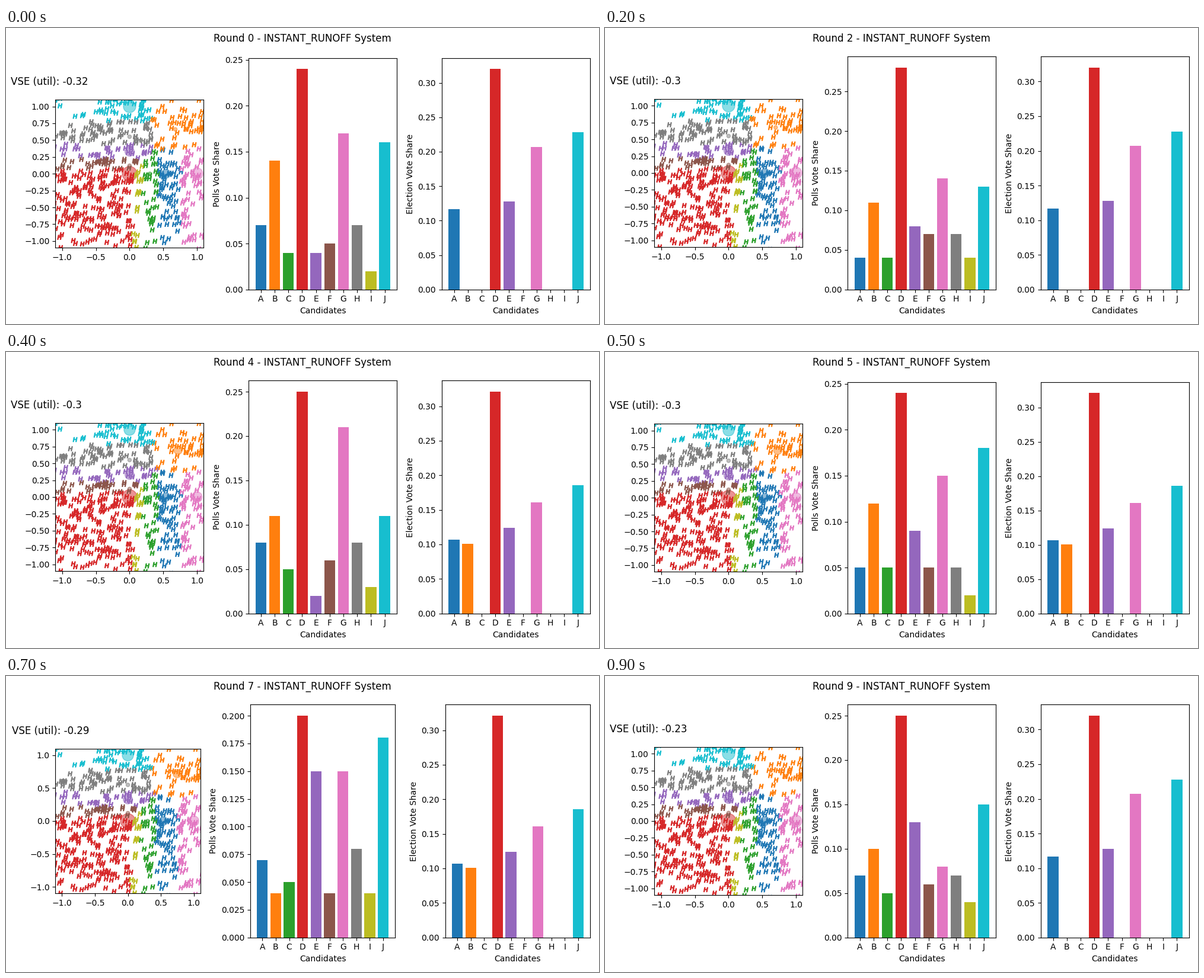
Write a matplotlib script that moves like this. It is 1000 px wide and 500 px high and loops after 1000 ms.

```python
import numpy as np
import matplotlib.pyplot as plt
from matplotlib.animation import FuncAnimation

ROUNDS = 10
NAMES = list("ABCDEFGHIJ")
COLORS = np.array([f"C{i}" for i in range(len(NAMES))])
MARGINS = dict(left=0.125, right=0.9, bottom=0.11, top=0.88, wspace=0.2)

# Poll percentages at key rounds; rounds between are averaged
POLL_ROUNDS = [0, 2, 3, 4, 5, 7, 9]
POLLS = np.array([
    [7, 14, 4, 24, 4, 5, 17, 7, 2, 16],
    [4, 11, 4, 28, 8, 7, 14, 7, 4, 13],
    [6, 12, 3, 18, 9, 2, 21, 11, 2, 16],
    [8, 11, 5, 25, 2, 6, 21, 8, 3, 11],
    [5, 12, 5, 24, 9, 5, 15, 5, 2, 18],
    [7, 4, 5, 20, 15, 4, 15, 8, 4, 18],
    [7, 10, 5, 25, 13, 6, 8, 7, 4, 15],
]) / 100

# Final election shares, without and with B among the finalists
WITHOUT_B = dict(A=0.117, D=0.32, E=0.128, G=0.207, J=0.228)
WITH_B = dict(A=0.107, B=0.101, D=0.321, E=0.124, G=0.161, J=0.186)

VOTERS = np.random.default_rng(4).normal(0, 1, (1000, 2))


def poll_share(n):
    return [np.interp(n, POLL_ROUNDS, column) for column in POLLS.T]


def election_share(n):
    result = WITH_B if 3 <= n <= 8 else WITHOUT_B
    return np.array([result.get(name, 0) for name in NAMES])


def candidates(n):
    """Positions in round n; only B drifts outwards."""
    return np.array([
        (0.54, 0), (0.678 + 0.0101 * n, 0.66 + 0.0087 * n), (0.3, 0), (0, 0),
        (0, 0.33), (0, 0.12), (1, 0), (0, 0.55), (0.1, 0), (0, 1),
    ])


def draw_map(ax, n, share):
    spots = candidates(n)
    dist = np.linalg.norm(VOTERS[:, None] - spots, axis=2)
    ax.scatter(*spots.T, s=np.maximum(1000 * share, 20), c=COLORS, alpha=0.5)
    ax.scatter(*VOTERS.T, s=27, marker="$H$", c=COLORS[dist.argmin(axis=1)])
    ax.set(xlim=(-1.1, 1.1), ylim=(-1.1, 1.1), aspect="equal")
    vse = np.interp(n, [0, 2, 5, 7, 8, 9], [-0.32, -0.3, -0.3, -0.29, -0.29, -0.23])
    ax.text(-0.3, 1.1, f"VSE (util): {round(float(vse), 2)}", fontsize=12,
            transform=ax.transAxes)


def draw_bars(ax, share, label):
    ax.bar(NAMES, share, color=COLORS)
    ax.set(xlabel="Candidates", ylabel=label)


fig = plt.figure(figsize=(10, 5), dpi=100)


def draw(n):
    fig.clear()
    fig.subplots_adjust(**MARGINS)
    space, polls, votes = fig.subplots(1, 3)
    fig.suptitle(f"Round {n} - INSTANT_RUNOFF System", y=0.982)
    share = election_share(n)
    draw_map(space, n, share)
    draw_bars(polls, poll_share(n), "Polls Vote Share")
    draw_bars(votes, share, "Election Vote Share")
    fig.tight_layout()
    return []


anim = FuncAnimation(fig, draw, frames=ROUNDS, init_func=lambda: [],
                     interval=100, repeat=True, repeat_delay=0)
plt.show()
```
